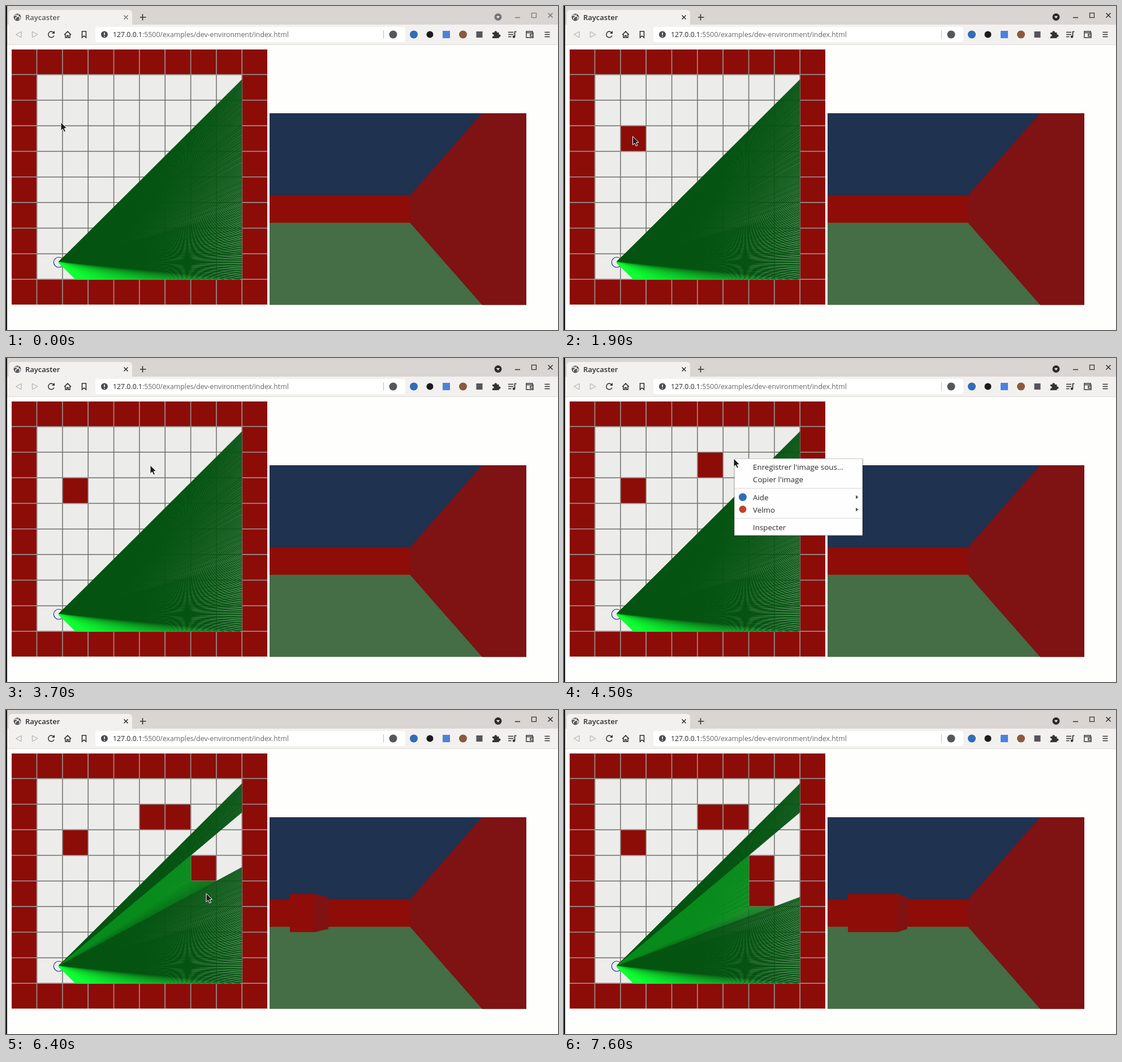
Recreate the animation shown at these times as an HTML page with a canvas. Size 976 px wide and 574 px high, loop 8 s.

```html
<!DOCTYPE html>
<html lang="fr">
<head>
<meta charset="utf-8">
<title>Raycaster</title>
<style>
html, body { margin: 0; width: 100%; height: 100%; overflow: hidden; background: #fefefd; }
canvas, svg { position: absolute; left: 0; top: 0; display: block; }
text { font-family: "Open Sans", "Noto Sans", sans-serif; }
</style>
</head>
<body>
<canvas id="scene" width="976" height="574"></canvas>
<svg width="976" height="574" viewBox="0 0 976 574">
  <rect width="976" height="34" fill="#d8d5d2"/>
  <path d="M5 34V13Q5 7 11 7H217Q223 7 223 13V34Z" fill="#f3f1ef"/>
  <rect y="33" width="976" height="35" fill="#f3f1ef"/>
  <rect y="68" width="976" height="1" fill="#dddbd8"/>
  <rect width="2" height="574" fill="#161616"/>

  <!-- tab strip -->
  <circle cx="20" cy="20" r="6.5" fill="#55565a"/>
  <path d="M15 17l4-1 1 3-3 2v3M22 15l-1 3 4 2-2 4" fill="none" stroke="#f3f1ef" stroke-width="1.5"/>
  <path d="M237 20h10.500M241.500 14.500v11" stroke="#333" stroke-width="1.6"/>
  <g id="caption">
    <text x="34" y="24.500" font-size="13" font-weight="600">Raycaster</text>
    <path d="M208.500 16.500l7 7m0-7l-7 7" stroke="currentColor" stroke-width="1.500"/>
    <circle cx="870" cy="19.500" r="6.500" fill="currentColor"/>
    <path d="M867 18h6l-3 4z" fill="#eee"/>
    <path d="M900 20.500h9M958.500 12.500l8 8m0-8l-8 8" stroke="currentColor" stroke-width="1.500"/>
    <rect x="929.500" y="12.500" width="8" height="8" fill="none" stroke="currentColor" stroke-width="1.200"/>
  </g>

  <!-- toolbar -->
  <g fill="none" stroke="#b9b7b5" stroke-width="1.300" stroke-linejoin="round">
    <path d="M27 45.500v10l-9.500-5zM46.500 45.500v10l9.500-5z"/>
  </g>
  <g fill="none" stroke="#333" stroke-width="1.600">
    <path d="M84.500 47.500A5.300 5.300 0 1 0 85 52.500"/>
    <path d="M86 44v5h-5z" fill="#333" stroke="none"/>
    <path d="M103 51l6-5.800 6 5.800M105 50v6h2.800v-3.500h2.400V56h2.800v-6"/>
    <path d="M134.500 45h7v11l-3.500-3-3.500 3z"/>
  </g>
  <rect x="158" y="37" width="548" height="27" rx="4" fill="#fff"/>
  <circle cx="174" cy="50.500" r="6" fill="#4b4b4d"/>
  <path d="M174 47v4.500M174 53v1.500" stroke="#fff" stroke-width="1.600"/>
  <text x="189" y="55" font-size="12.300" fill="#666">
    <tspan fill="#262626">127.0.0.1</tspan>:5500/examples/dev-environment/index.html</text>
  <path d="M667.500 43v15" stroke="#bbb"/>
  <circle cx="684.500" cy="50.500" r="7" fill="#55565a"/>
  <circle cx="721" cy="50.500" r="7" fill="#2f6db5"/>
  <circle cx="749.500" cy="50.500" r="6" fill="#1b1b1b"/>
  <rect x="772" y="44" width="13" height="13" fill="#4a83dc"/>
  <circle cx="808" cy="50.500" r="7" fill="#8b5a3c"/>
  <rect x="831.500" y="45" width="11" height="11" fill="#55565a"/>
  <path d="M860 47h3.500a2.300 2.300 0 1 1 4.500 0h3.500v3.500a2.300 2.300 0 1 1 0 4.400V57H860v-3.200a2 2 0 1 0 0-3.800z" fill="#333"/>
  <path d="M888 46.500h9M888 50.500h9M888 54.500h5.500M899.500 54.500v-9h3" fill="none" stroke="#333" stroke-width="1.700"/>
  <circle cx="898" cy="54.500" r="2.200" fill="#333"/>
  <path d="M931 47v-2h-11v11h12v-8.500h-12M932 50h-5v3.500h5" fill="none" stroke="#333" stroke-width="1.400"/>
  <path d="M952.500 46.500h9M952.500 50.500h9M952.500 54.500h9" stroke="#333" stroke-width="1.500"/>

  <g id="menu">
    <rect x="-1" y="1" width="230" height="138" rx="2" fill="#000" opacity=".08"/>
    <rect x="-1" y="0" width="229" height="137.500" fill="#000" opacity=".1"/>
    <rect x=".5" y=".5" width="226" height="135.500" fill="#fefefe" stroke="#c9c8c6"/>
    <path d="M1 53h225M1 106h225" stroke="#d6d5d3"/>
    <g font-size="13.400" fill="#2b2b2b">
      <text x="33" y="20">Enregistrer l'image sous…</text>
      <text x="33" y="42">Copier l'image</text>
      <text x="33" y="73.500">Aide</text>
      <text x="33" y="95.500">Velmo</text>
      <text x="33" y="127">Inspecter</text>
    </g>
    <circle cx="15" cy="68.500" r="7" fill="#2f6db5"/>
    <circle cx="15" cy="90" r="6.500" fill="#c4412c"/>
    <path d="M215 65v7l4.500-3.500zM215 87v7l4.500-3.500z" fill="#555"/>
  </g>
  <path id="cursor" d="M0 0V15L3.400 11.900 5.900 17.200 8.500 16 6.100 10.900 10.600 10.500Z"
    fill="#1c1c1c" stroke="#fff" stroke-width="1"/>
</svg>
<script>
const LOOP = 8000, STEP = 100;
const CELL = 45.35, LEFT = 9.2, TOP = 76.15, SIZE = 10;
const PLAYER = { x: 93.3, y: 454 };
const VIEW = { x: 466, y: 190, w: 454, h: 339.5 };
const WALL_SCALE = 15700;

// column, row, time of placement
const blocks = [[2, 3, 1700], [5, 2, 3800], [6, 2, 4800], [7, 4, 6100], [7, 5, 6900]];
// open, close, x, y
const menus = [[1100, 1300, 132, 240], [3400, 3600, 253, 190], [4400, 4600, 301, 178],
  [5700, 5900, 350, 282], [6500, 6800, 356, 326]];
// time, x, y
const path = [[0, 97, 206], [500, 119, 246], [700, 129, 257], [900, 131, 240], [1300, 131, 240],
  [1500, 113, 231], [1800, 113, 231], [2000, 130, 231], [2400, 130, 231], [3000, 211, 208],
  [3200, 343, 196], [3300, 268, 193], [3400, 252, 190], [3600, 252, 190], [3700, 255, 190],
  [3900, 255, 190], [4300, 300, 178], [4700, 300, 178], [5600, 349, 282], [6000, 349, 282],
  [6400, 354, 325], [7200, 354, 325], [7500, 72, 194]];
const CURSOR_END = 7600;

const $ = id => document.getElementById(id);
const ctx = $('scene').getContext('2d');

function cursorAt(t) {
  const i = path.findIndex(p => p[0] > t);
  if (i < 0) return path[path.length - 1].slice(1);
  const [a, b] = [path[i - 1], path[i]];
  const k = (t - a[0]) / (b[0] - a[0]);
  return [a[1] + (b[1] - a[1]) * k, a[2] + (b[2] - a[2]) * k];
}

function isSolid(x, y, placed) {
  const edge = SIZE - 1;
  return x <= 0 || y <= 0 || x >= edge || y >= edge ||
    placed.some(b => b[0] === x && b[1] === y);
}

// Walks the grid along (1, slope); returns the forward distance and wall side.
function cast(slope, placed) {
  const px = (PLAYER.x - LEFT) / CELL, py = (PLAYER.y - TOP) / CELL;
  let x = Math.floor(px), y = Math.floor(py);
  const down = slope > 0, stepY = 1 / Math.abs(slope);
  let nextX = x + 1 - px;
  let nextY = (down ? y + 1 - py : py - y) * stepY;
  for (;;) {
    const side = nextY < nextX;
    const dist = side ? nextY : nextX;
    if (side) { y += down ? 1 : -1; nextY += stepY; }
    else { x++; nextX++; }
    if (isSolid(x, y, placed)) return { dist: dist * CELL, side };
  }
}

function drawMap(placed) {
  const end = SIZE * CELL;
  ctx.save();
  ctx.beginPath();
  ctx.rect(10, 77, 452, 452);
  ctx.clip();
  ctx.fillStyle = '#ececeb';
  ctx.fillRect(LEFT, TOP, end, end);
  ctx.lineWidth = 1.5;
  ctx.strokeStyle = '#6d6d69';
  ctx.beginPath();
  for (let i = 1; i < SIZE; i++) {
    const d = i * CELL;
    ctx.moveTo(LEFT + d, TOP);
    ctx.lineTo(LEFT + d, TOP + end);
    ctx.moveTo(LEFT, TOP + d);
    ctx.lineTo(LEFT + end, TOP + d);
  }
  ctx.stroke();
  ctx.fillStyle = '#8c0c08';
  ctx.strokeStyle = '#989390';
  for (let y = 0; y < SIZE; y++) {
    for (let x = 0; x < SIZE; x++) {
      if (!isSolid(x, y, placed)) continue;
      const box = [LEFT + x * CELL, TOP + y * CELL, CELL, CELL];
      ctx.fillRect(...box);
      ctx.strokeRect(...box);
    }
  }
  ctx.restore();
  ctx.strokeStyle = '#2424a4';
  ctx.lineWidth = 1.2;
  ctx.beginPath();
  ctx.arc(PLAYER.x, PLAYER.y, 9, 0, 2 * Math.PI);
  ctx.stroke();
}

function drawRay(slope, dist) {
  const g = Math.max(0, Math.min(255, 280 - 0.605 * dist));
  ctx.strokeStyle = `rgb(${g * 0.06},${g},${g * 0.2})`;
  ctx.beginPath();
  ctx.moveTo(PLAYER.x, PLAYER.y);
  ctx.lineTo(PLAYER.x + dist, PLAYER.y + dist * slope);
  ctx.stroke();
}

function drawColumn(i, hit) {
  const h = Math.min(VIEW.h, WALL_SCALE / hit.dist);
  ctx.fillStyle = hit.side ? '#7f1213' : '#8e0d08';
  ctx.fillRect(VIEW.x + i, VIEW.y + (VIEW.h - h) / 2, 1, h);
}

function drawScene(placed) {
  ctx.fillStyle = '#fefefd';
  ctx.fillRect(0, 0, 976, 574);
  drawMap(placed);
  ctx.fillStyle = '#1f324f';
  ctx.fillRect(VIEW.x, VIEW.y, VIEW.w, VIEW.h / 2);
  ctx.fillStyle = '#456d46';
  ctx.fillRect(VIEW.x, VIEW.y + VIEW.h / 2, VIEW.w, VIEW.h / 2);
  ctx.lineWidth = 1.3;
  for (let i = 0; i < VIEW.w; i++) {
    const slope = 2 * (i + 0.5) / VIEW.w - 1;
    const hit = cast(slope, placed);
    drawRay(slope, hit.dist);
    drawColumn(i, hit);
  }
}

let shown = -1;
function render(time) {
  const t = Math.floor(time % LOOP / STEP) * STEP;
  const placed = blocks.filter(b => t >= b[2]);
  if (placed.length !== shown) {
    shown = placed.length;
    drawScene(placed);
  }

  const tone = t < 1100 ? '#77777a' : '#2d2d2f';
  $('caption').style.color = tone;
  $('caption').setAttribute('fill', t < 1100 ? '#5c5c5e' : tone);

  const open = menus.find(m => t >= m[0] && t < m[1]);
  $('menu').style.display = open ? '' : 'none';
  if (open) $('menu').setAttribute('transform', `translate(${open[2]} ${open[3]})`);

  const [x, y] = cursorAt(t);
  $('cursor').style.display = t < CURSOR_END ? '' : 'none';
  $('cursor').setAttribute('transform', `translate(${x} ${y})`);
}

const start = performance.now();
function tick() {
  render(performance.now() - start);
  requestAnimationFrame(tick);
}
tick();
</script>
</body>
</html>
```
